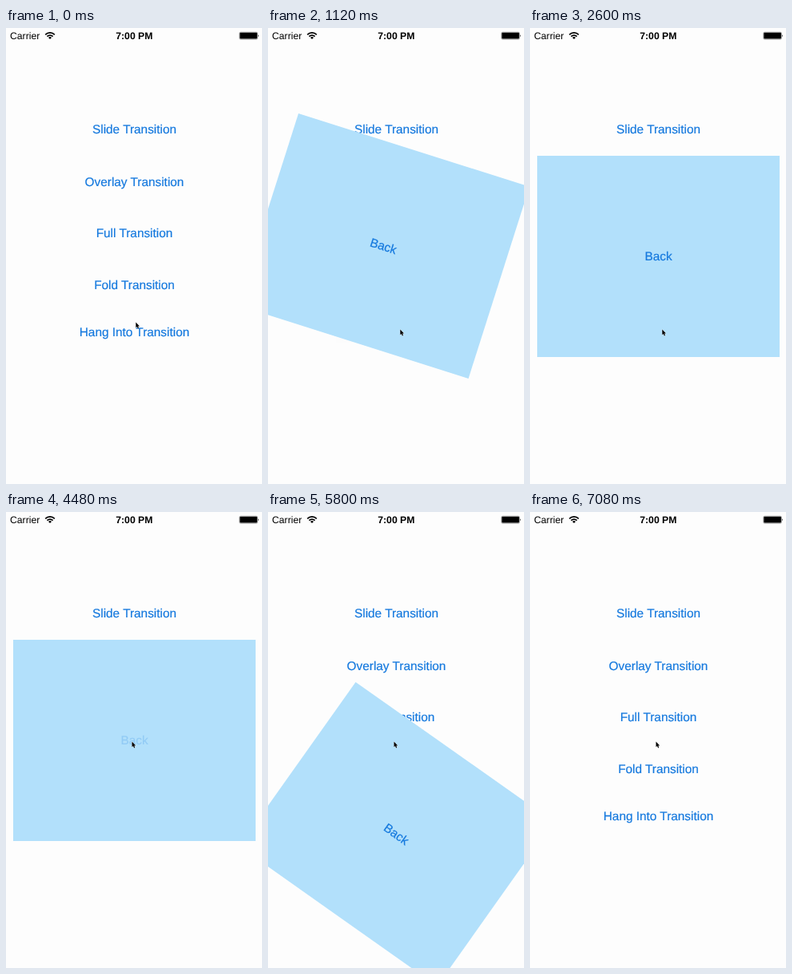
Recreate the animation shown at these times as an HTML page. Size 320 by 571 pixels, loop 8 s.

```html
<!DOCTYPE html>
<html lang="en">
<head>
<meta charset="utf-8">
<title>Hang Into Transition</title>
<style>
  html, body { margin: 0; height: 100%; overflow: hidden; background: #fdfdfd; }
  svg { display: block; width: 100vw; height: 100vh; }
  text { font-family: "Liberation Sans", Arial, sans-serif; text-rendering: geometricPrecision; }
  .button { font-size: 15.36px; fill: #1579de; stroke: #1579de; stroke-width: .2; text-anchor: middle; }
  .status { font-size: 12.2px; fill: #000; }
</style>
</head>
<body>
<svg viewBox="0 0 320 571">
  <rect width="320" height="571" fill="#fdfdfd"/>
  <text class="button" x="160.5" y="132">Slide Transition</text>
  <text class="button" x="160.5" y="197.6">Overlay Transition</text>
  <text class="button" x="160.5" y="262">Full Transition</text>
  <text class="button" x="160.5" y="327">Fold Transition</text>
  <text class="button" x="160.5" y="386">Hang Into Transition</text>
  <rect id="dim" x="85" y="366" width="150" height="28" fill="#fdfdfd" opacity=".8"/>

  <g id="card">
    <rect x="-151.5" y="-126" width="303" height="252" fill="#b2e0fb"/>
    <text class="button" y="5.4" id="back">Back</text>
  </g>

  <text class="status" x="5" y="14">Carrier</text>
  <g fill="none" stroke="#000" stroke-width="1.7">
    <path d="M49.2 8.3a8 8 0 0 1 11.6 0M51.4 10.6a5 5 0 0 1 7.2 0"/>
    <path d="M55 14l-2-2.1a3 3 0 0 1 4 0z" fill="#000" stroke="none"/>
  </g>
  <text class="status" x="160.3" y="14" font-weight="bold" text-anchor="middle">7:00 PM</text>
  <rect x="291.7" y="5.2" width="22.8" height="9" rx="1.6" fill="none" stroke="#777" stroke-width=".6"/>
  <rect x="292.3" y="5.8" width="21.6" height="7.8" rx="1"/>
  <path d="M315.3 8.2q1.6 1.5 0 3z"/>

  <path id="cursor" d="M0 0V6.6L1.5 5.3 2.6 7.8 3.7 7.3 2.7 4.9H4.7Z" stroke="#fff" stroke-width=".6" paint-order="stroke"/>
</svg>
<script>
const LOOP = 8, STEP = 0.04;
const REST = { x: 160.5, y: 286 };
const ENTER = 0.85, RELEASE = 4.626, REMOVED = 7.08;

const $ = id => document.getElementById(id);
const progress = (t, from, to) => Math.min(1, Math.max(0, (t - from) / (to - from)));
const smooth = p => p * p * (3 - 2 * p);
const show = (id, visible) => { $(id).style.display = visible ? "" : "none"; };

// Drops in from above on a spring while the tilt settles.
function enterPose(s) {
  const w = 7.63, damping = 0.65;
  const spring = Math.exp(-damping * w * s) * (Math.cos(w * s) + damping * Math.sin(w * s));
  const settle = (1 + 6.5 * s) * Math.exp(-6.5 * s);
  return { x: REST.x - 34 * settle, y: REST.y - 480 * spring, angle: 37 * settle };
}

// Falls under gravity with a slowing spin.
function exitPose(s) {
  return { x: REST.x, y: REST.y + 85.1 * s * s, angle: 58.8 * (1 - Math.exp(-0.78 * s)) };
}

function cursorAt(t) {
  if (t < 3) {
    const p = smooth(progress(t, 0, 0.72));
    return [162.3 + 3 * p, 368.6 + 9 * p];
  }
  const p = smooth(progress(t, 3, 3.92));
  return [165.3 - 7.8 * p + 5 * Math.sin(2 * Math.PI * p), 377.6 - 90 * p];
}

function render(t) {
  const shown = t >= ENTER && t < REMOVED;
  show("card", shown);
  show("dim", t >= 0.76 && t < REMOVED);
  if (shown) {
    const { x, y, angle } = t < RELEASE ? enterPose(t - ENTER) : exitPose(t - RELEASE);
    $("card").setAttribute("transform", `translate(${x} ${y}) rotate(${angle})`);
  }
  $("back").setAttribute("opacity", t < 4.48 ? 1 : 0.2 + 0.8 * progress(t, 4.54, 5.02));
  $("cursor").setAttribute("transform", `translate(${cursorAt(t)})`);
}

function tick() {
  const t = performance.now() / 1000 % LOOP;
  render(Math.floor(t / STEP + 1e-6) * STEP + 1e-6);
  requestAnimationFrame(tick);
}
tick();
</script>
</body>
</html>
```
